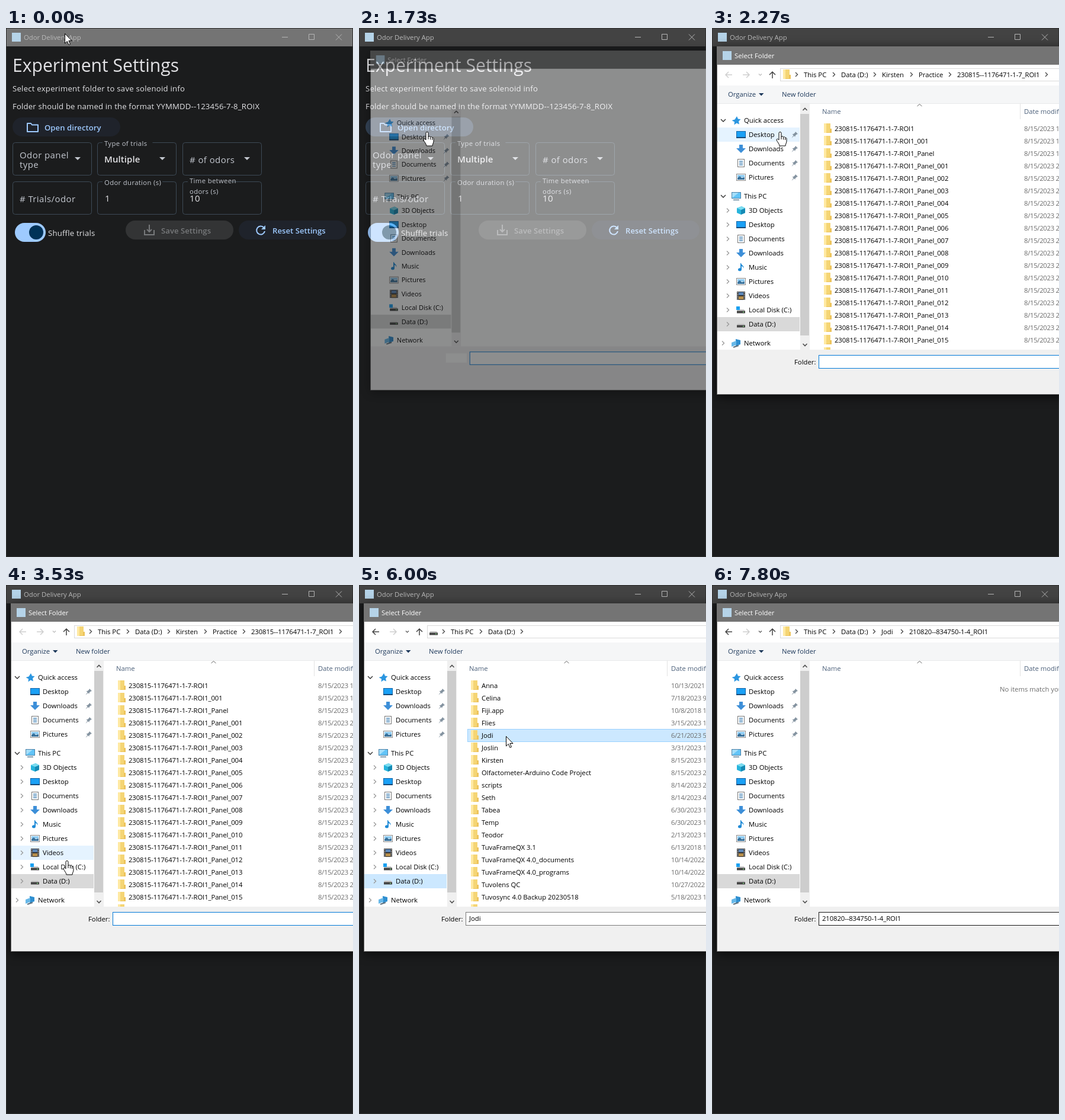
An HTML page for the animation above (8 s loop, 586x893 px).

```html
<!DOCTYPE html>
<html lang="en">
<head>
<meta charset="utf-8">
<title>Odor Delivery App</title>
<style>
html, body { margin: 0; width: 100%; height: 100%; overflow: hidden; background: #1b1c1d; }
svg { display: block; width: 100vw; height: 100vh; }
text { font-family: "Open Sans", "Noto Sans", sans-serif; white-space: pre; }
.shadow { filter: drop-shadow(0 3px 9px #000a); }
</style>
</head>
<body>
<svg id="stage" viewBox="0 0 586 893"></svg>
<script>
const LOOP = 8000, FPS = 15;
const PAGE = '#1b1c1d', BLUE = '#9ecaff', PALE = '#e2e2e5';

// Drawing helpers, all returning SVG markup
const text = (x, y, s, size = 11.3, fill = '#000', gap = 0, weight = 400) =>
  `<text x="${x}" y="${y}" font-size="${size}" fill="${fill}" letter-spacing="${gap}" font-weight="${weight}">${s}</text>`;
const rect = (x, y, w, h, fill, more = '') =>
  `<rect x="${x}" y="${y}" width="${w}" height="${h}" fill="${fill}" ${more}/>`;
const frame = (x, y, w, h, fill, stroke, more = '') =>
  rect(x + .5, y + .5, w - 1, h - 1, fill, `stroke="${stroke}" ${more}`);
const path = (d, fill, more = '') => `<path d="${d}" fill="${fill}" ${more}/>`;
const line = (d, stroke, width = 1, more = '') =>
  path(d, 'none', `stroke="${stroke}" stroke-width="${width}" ${more}`);
const group = (x, y, body) => `<g transform="translate(${x} ${y})">${body}</g>`;
const right = (x, y, color) => line(`M${x - 2} ${y - 3.5}l3.5 3.5l-3.5 3.5`, color, 1.3);
const down = (x, y, color) => line(`M${x - 4} ${y - 2}l4 4l4-4`, color, 1.4);
const clamp = v => Math.max(0, Math.min(1, v));

const appIcon = (x, y) => rect(x, y, 15, 15, '#b5d3e8');
const folder = (x, y) => group(x, y,
  rect(0, 0, 11, 15, '#f5d575') + path('M0 0h4v16h-4z', '#ffe9a2') +
  path('M10 9h3v7h-9v-1h6z', '#edc45c'));

const monitor = frame(-8, -6, 16, 12, '#1aa0f5', '#1765a5') + rect(-8, 4, 16, 2, '#174a78');
const drive = path('M-6-1h11l2 3h-14z', '#c9c9c9') + rect(-7, 1.5, 14, 4, '#444') + rect(3, 3, 2, 1, '#8f8');
const icons = {
  star: path('M1-7l2 4.5 4.5 .5-3.5 3.5 1 5-4.5-2-4 3 .5-5-4.5-2.5 5-1.5z', '#2b96e0'),
  monitor,
  arrow: path('M-3-7h6v6h5l-8 8-8-8h5z', '#3d8fd8'),
  doc: frame(-6, -7, 12, 14, '#fff', '#777') + line('M-3-3h6M-3 0h6M-3 3h6', '#4a86b8', 1.3),
  picture: frame(-8, -6, 16, 12, '#fff', '#888') + rect(-6, -4, 12, 4, '#8fccf2') + path('M-6 4v-3l4-3 3 3 5-1v4z', '#39729c'),
  pc: frame(-8, -7, 16, 11, '#62c4f7', '#4c82a8') + path('M-7 3v-9h11z', '#a5def9') + rect(-5, 5.5, 10, 1.5, '#5c7f96'),
  cube: path('M-7-4l8-3 6 3v8l-7 3-7-3z', '#27b4dc') + path('M0-1l7-3v8l-7 3z', '#168ab4') + path('M-7-4l8-3 6 3-7 3z', '#7cdcf0'),
  note: path('M0-7c1 4 6 4 4 9 0-3-2-4-3-4v6a3 2.5 0 1 1-2-2.5v-8.5z', '#1e8ad6'),
  film: rect(-7, -7, 14, 14, '#333') + rect(-4, -6, 8, 5, '#5b86b8') + rect(-4, 1, 8, 5, '#b88f4b') +
    line('M-5.5-6v13M5.5-6v13', '#ddd', 1.5, 'stroke-dasharray="1.5 1.5"'),
  disk: drive + rect(-8, -6, 6, 6, '#1aa0f0'),
  drive,
  net: path('M-1-7l8 2v7l-8 3z', '#2f8fd0') + path('M-8-1l8-3v7l-8 3z', '#67b8e8') + line('M-5 7l9-3', '#5b6f7e', 2)
};

// Navigation pane: label, icon, middle of the row, level
const nav = [['Quick access', 'star', 156, 0]];
[['Desktop', 'monitor'], ['Downloads', 'arrow'], ['Documents', 'doc'], ['Pictures', 'picture']]
  .forEach(([s, i], n) => nav.push([s, i, 180 + 24 * n, 1]));
nav.push(['This PC', 'pc', 284, 0]);
[['3D Objects', 'cube'], ['Desktop', 'monitor'], ['Documents', 'doc'], ['Downloads', 'arrow'], ['Music', 'note'],
 ['Pictures', 'picture'], ['Videos', 'film'], ['Local Disk (C:)', 'disk'], ['Data (D:)', 'drive']]
  .forEach(([s, i], n) => nav.push([s, i, 308 + 24 * n, 1]));
nav.push(['Network', 'net', 532, 0]);

// Folder listings: name and date
const panels = Array.from({ length: 19 }, (_, i) => [
  '230815-1176471-1-7-ROI1' + (i == 0 ? '' : i == 1 ? '_001' : i == 2 ? '_Panel' : '_Panel_' + String(i - 2).padStart(3, '0')),
  '8/15/2023 ' + (i < 3 ? '1:52 PM' : '2:10 PM')]);
const disk = `Anna,10/13/2021 2|Celina,7/18/2023 9:|Fiji.app,10/8/2018 1:|Flies,3/15/2023 1:|Jodi,6/21/2023 5:|Joslin,3/31/2023 1:|Kirsten,8/15/2023 1:|Olfactometer-Arduino Code Project,8/15/2023 2:|scripts,8/14/2023 2:|Seth,8/14/2023 4:|Tabea,6/30/2023 1:|Temp,6/30/2023 1:|Teodor,2/13/2023 1:|TuvaFrameQX 3.1,6/13/2018 1:|TuvaFrameQX 4.0_documents,10/14/2022 1|TuvaFrameQX 4.0_programs,10/14/2022 1|Tuvolens QC,10/27/2022 1|Tuvosync 4.0 Backup 20230518,5/18/2023 1:|,`
  .split('|').map(s => s.split(','));
const chosen = '210820--834750-1-4_ROI1';
const personal = [['210813--834750-1-2_ROI1', '8/13/2021 3:'], [chosen, '8/20/2021 1:'],
  ['210827--834751-2-1_ROI1', '8/27/2021 2:'], ['210903--834751-2-3_ROI1', '9/3/2021 11:']];

// Pointer path: step, x, y
const route = [[0, 99, 9], [4, 99, 9], [13, 115, 176], [40, 115, 176], [53, 103, 466], [58, 119, 494], [78, 119, 494],
  [88, 248, 255], [97, 248, 255], [104, 252, 192], [114, 252, 192], [117, 610, 563], [120, 610, 563]];
function pointer(k) {
  const i = Math.max(1, route.findIndex(p => p[0] >= k));
  const [a, x, y] = route[i - 1], [b, u, v] = route[i];
  const p = clamp((k - a) / (b - a)), e = p * p * (3 - 2 * p);
  return [x + (u - x) * e, y + (v - y) * e];
}

function cursor(k) {
  const [x, y] = pointer(k);
  const hand = k >= 12 && k < 72;
  return group(x, y, hand
    ? path('M-2 1.5A2 2 0 0 1 2 1.5V8A1.8 1.8 0 0 1 5.5 8.5A1.7 1.7 0 0 1 8.6 9.5A1.5 1.5 0 0 1 11 11V15C11 18 9 20 9 23H-1C-1 20-5 16-6 13C-6 11-4 10.5-2 13Z',
      '#fff', 'stroke="#000"') + line('M2 8v4M5.5 9v3.5M8.6 10v3', '#000')
    : path('M.5 .5V17L4.3 13.4 7 19.5 9.5 18.4 6.9 12.5H12Z', '#fff', 'stroke="#000"'));
}

function field(x, y, label = '') {
  const lines = label.split('\n');
  const width = Math.max(...lines.map(s => s.length)) * 5.6 + 6;
  return frame(x, y, 134, 56, 'none', '#3d4a56', 'rx="4"') +
    (label ? rect(x + 9, y - 1, width, 3, PAGE) : '') +
    lines.map((s, i) => text(x + 12, y + 6 - (lines.length - 1) * 3 + i * 18, s, 11.3, '#c3c7cf', .35)).join('');
}
const pill = (x, y, fill, label, color, labelX) =>
  rect(x, y, 182, 32, fill, 'rx="16"') + text(labelX, y + 22, label, 13.1, color, .05, 600);
const dropMark = x => path(`M${x - 5} 218h10l-5 5z`, '#c3c7cf');

function app(k) {
  const bar = k < 19 ? '#747474' : k < 20 ? '#5c5c5c' : '#434343';
  const over = pointer(k)[1] > 150 && k < 28;
  const label = (x, y, s) => text(x, y, s, 15, '#c3c7cf', .4);
  return rect(0, 0, 586, 893, PAGE) + rect(0, 0, 586, 31, bar) +
    appIcon(10, 8) + text(30, 20, 'Odor Delivery App', 11.3, '#b9b9b9') +
    line('M466 15.5h10M511.5 10.5h9v9h-9zM557 10.5l10 10M567 10.5l-10 10', '#b5b5b5') +
    frame(0, 0, 586, 893, 'none', '#303030') +
    text(11, 74, 'Experiment Settings', 30.1, PALE) +
    text(11, 107, 'Select experiment folder to save solenoid info', 13.15, PALE, .25) +
    text(11, 137, 'Folder should be named in the format YYMMDD--123456-7-8_ROIX', 13.15, PALE, .18) +
    pill(11, 151, k >= 19 && over ? '#344356' : over ? '#28313d' : '#1f232b', 'Open directory', BLUE, 65) +
    line('M36 161h6l2 2.5h10v11.5h-18z', BLUE, 2, 'stroke-linejoin="round"') +
    field(11, 193) + label(23, 220, 'Odor panel') + label(23, 236, 'type') + dropMark(121) +
    field(154, 193, 'Type of trials') + text(166, 227, 'Multiple', 15, PALE, .1, 600) + dropMark(264) +
    field(298, 193) + label(310, 228, '# of odors') + dropMark(407) +
    field(11, 259) + label(23, 294, '# Trials/odor') +
    field(154, 259, 'Odor duration (s)') + text(167, 293, '1', 15, PALE, .5) +
    field(298, 259, 'Time between\nodors (s)') + text(310, 293, '10', 15, PALE, .5) +
    rect(15, 329, 52, 32, BLUE, 'rx="16"') + '<circle cx="51" cy="345" r="12" fill="#003258"/>' +
    text(71, 351, 'Shuffle trials', 13.15, PALE, .2) +
    pill(202, 325, '#333435', 'Save Settings', '#77797b', 262) +
    line('M234 341v8h16v-8M242 332v11M238 340l4 4 4-4', '#77797b', 2) +
    pill(393, 325, '#1f232b', 'Reset Settings', BLUE, 450) +
    line('M435.5 337a7 7 0 1 0 1.5 6', BLUE, 2) + path('M438 333v7h-7z', BLUE);
}

function navPane(k, ready) {
  const [px, py] = pointer(k - 1);
  const closed = clamp(1 - (k - 92) / 5), open = clamp(1 - (k - 97) / 9);
  let out = '';
  nav.forEach(([label, icon, y, level], i) => {
    const x = 41 + 8 * level;
    const hover = ready && px < 148 && Math.abs(py - y) <= 12;
    if (label == 'Data (D:)') {
      const active = hover || (k >= 72 && k < 93);
      out += rect(9, y - 12, 139, 24, active ? '#cce8ff' : '#d9d9d9') +
        (hover ? frame(9, y - 12, 139, 24, 'none', '#99d1ff') : '');
    } else if (hover) out += rect(9, y - 12, 139, 24, '#e5f3ff');
    out += group(x, y, icons[icon]) + text(x + 13, y + 4, label);
    if (i > 0 && i < 5) out += group(140, y, path('M1-5l4 4-2 .5-2.5 2.5 0 2-2-2-4 4 3-5-2-2 2 0 2.5-2z', '#8493a0'));
    if (!ready) return;
    if (i == 0 || i == 5) out += `<g opacity="${open}">${down(19, y, '#333')}</g>`;
    else if (i > 5) out += `<g opacity="${closed}">${right(level ? 27 : 19, y, '#999')}</g>`;
  });
  return out + rect(149, 128, 16, 415, '#f0f0f0') + rect(149, 145, 15, 374, '#cdcdcd') +
    line('M153.5 139l3.5-3.5 3.5 3.5M153.5 533l3.5 3.5 3.5-3.5', '#505050', 1.6);
}

function list(k) {
  const rows = k < 73 ? panels : k < 74 ? [] : k < 92 ? disk : k < 93 ? [] : k < 109 ? personal : [];
  const selected = rows == disk && k >= 89 ? 4 : rows == personal && k >= 106 ? 1 : -1;
  const [px, py] = pointer(k - 1);
  const hover = px > 183 ? Math.floor((py - 159) / 21) : -1;
  let out = text(186, 145, 'Name', 11.3, '#4c607a') + text(527, 145, 'Date modified', 11.3, '#4c607a') +
    line('M346.5 132l4-3.5 4 3.5', '#666') + rect(520, 128, 1, 26, '#e2e2e2');
  rows.forEach(([name, date], i) => {
    const y = 159 + 21 * i;
    if (i == selected) out += frame(183, y, 420, 22, '#cce8ff', '#99d1ff');
    else if (i == hover) out += rect(183, y, 420, 21, '#e5f3ff');
    out += folder(189, y + 2) + text(207, y + 15, name, 11.3, '#000', rows == disk ? 0 : -.1) +
      text(527, y + 15, date, 11.3, '#6d6d6d', -.3);
  });
  return out + (k >= 109 ? text(486, 180, 'No items match your search.', 11.3, '#6d6d6d') : '');
}

function address(k) {
  const crumbs = [[155, 'This PC'], [218, 'Data (D:)']];
  if (k < 73) crumbs.push([287, 'Kirsten'], [349, 'Practice'], [414, '230815--1176471-1-7_ROI1']);
  else if (k >= 92) crumbs.push([286, 'Jodi']);
  if (k >= 109) crumbs.push([333, chosen]);
  const end = k < 73 ? 565 : k < 92 ? 275 : k < 109 ? 321 : 0;
  const back = k < 73 ? '#cfcfcf' : '#444';
  return line('M34 79h-11M28 74l-5 5 5 5', back, 1.5) + line('M52 79h11M58 74l5 5-5 5', '#cfcfcf', 1.5) +
    line('M79 77.5l2.5 2.5 2.5-2.5', k < 73 ? '#bbb' : '#555', 1.2) + line('M102 85v-11M97 79l5-5 5 5', '#444', 1.5) +
    frame(115, 68, 500, 22, '#fff', '#d9d9d9') +
    (k >= 73 && k < 92 ? group(126, 79, drive) : folder(120, 70)) +
    crumbs.map(([x, s]) => right(x - 12, 78.5, '#444') + text(x, 83, s, 11.3, '#000', s.length > 12 ? -.1 : 0)).join('') +
    (end ? right(end, 78.5, '#444') : '');
}

function dialog(k) {
  if (k < 23) return '';
  const p = clamp((k - 23) / 6), scale = .95 + .05 * p, ready = k >= 28;
  const value = k < 74 ? '' : k < 89 ? 'Data (D:)' : k < 106 ? 'Jodi' : chosen;
  const border = k < 72 ? '#0078d7' : k < 117 ? '#7a7a7a' : '#171717';
  const caret = ready && k < 72 && Math.floor((k - 26) / 8) % 2 == 0;
  const body = rect(8, 31, 880, 588, '#6f6f6f', 'class="shadow"') + rect(9, 62, 878, 556, '#fff') +
    rect(8, 31, 880, 31, '#747474') + appIcon(18, 39) + text(38, 51, 'Select Folder', 11.3, '#fff') +
    (ready ? address(k) + rect(9, 97, 878, 31, '#f5f6f7') + rect(9, 127, 878, 1, '#e8e9ea') +
      text(27, 116, 'Organize', 11.3, '#1e395b') + path('M79 110h8.5l-4.25 4.5z', '#1e395b') +
      text(118, 116, 'New folder', 11.3, '#1e395b') + list(k) : '') +
    navPane(k, ready) + rect(9, 543, 878, 75, '#f0f0f0') +
    (ready ? text(139, 568, 'Folder:') : rect(139, 555, 36, 16, '#fff')) +
    frame(180, 552, 500, 23, '#fff', border) + text(186, 567, value, 11.3, '#000', value == chosen ? -.1 : 0) +
    (caret ? rect(186, 555, 1, 15, '#000') : '');
  return `<g opacity="${p}" transform="translate(448 325) scale(${scale}) translate(-448 -325)">${body}</g>`;
}

const stage = document.getElementById('stage');
const start = performance.now();
let shown = -1;
function tick() {
  const t = (performance.now() - start) % LOOP;
  const k = Math.floor((t + 4) * FPS / 1000) % (LOOP * FPS / 1000);
  if (k != shown) stage.innerHTML = app(k) + dialog(k) + cursor(k);
  shown = k;
  requestAnimationFrame(tick);
}
tick();
</script>
</body>
</html>
```
